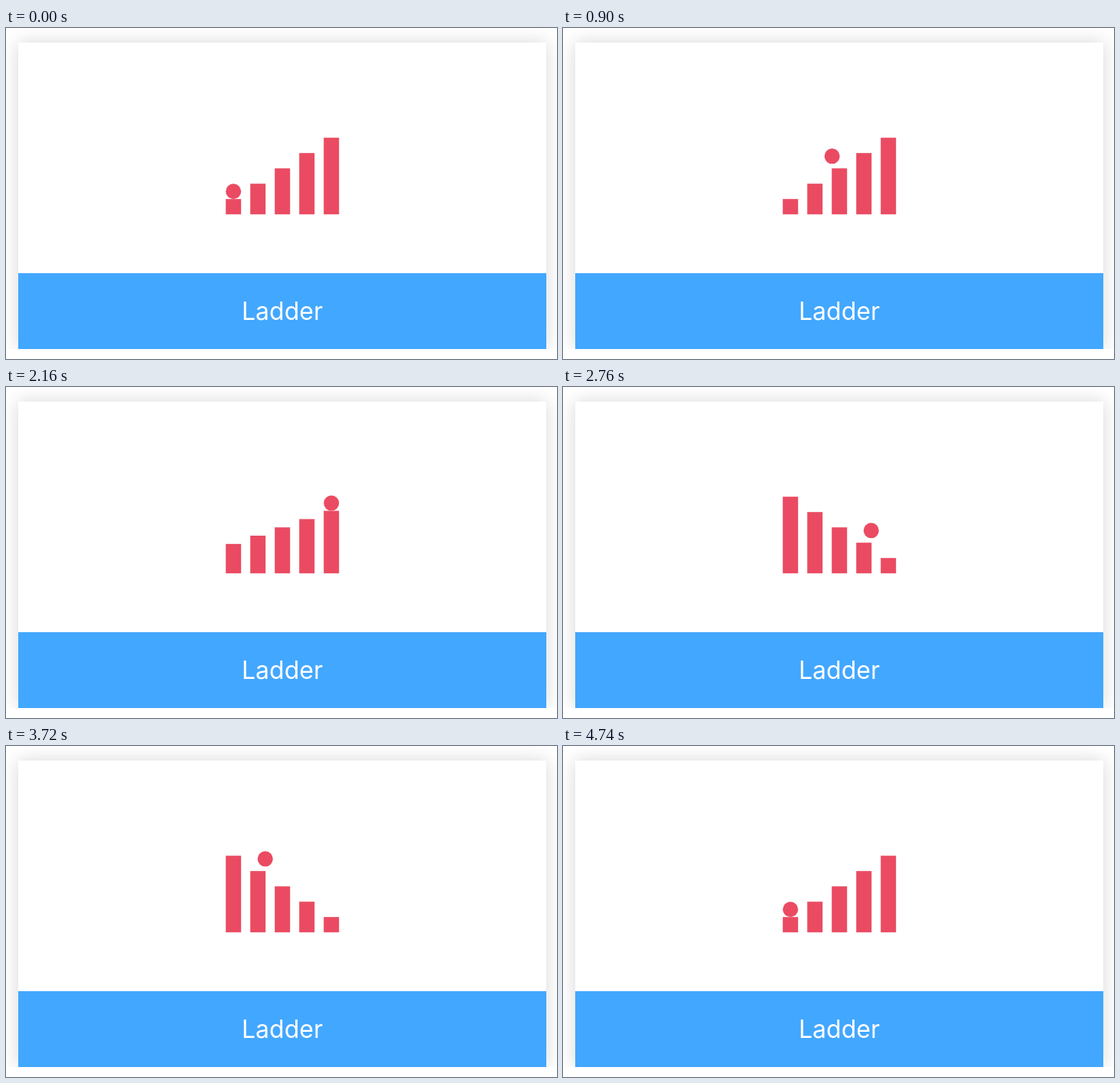
These frames come from a looping animation (720 by 432 pixels, 4.86 s). An HTML page:

```html
<!DOCTYPE html>
<html lang="en">
<head>
<meta charset="utf-8">
<title>Ladder</title>
<style>
  html, body { margin: 0; width: 100%; height: 100%; overflow: hidden; background: #fff; }
  .stage { position: relative; width: 720px; height: 419px; overflow: hidden; }
  .card {
    position: absolute; left: 16px; top: 19px; width: 690px; height: 400px;
    background: #fff; box-shadow: 0 0 22px rgba(0, 0, 0, .16);
  }
  svg { position: absolute; left: 0; top: 0; }
  text { font: 400 32px Inter, "Liberation Sans", sans-serif; fill: #fff; text-anchor: middle; }
</style>
</head>
<body>
<div class="stage">
  <div class="card"></div>
  <svg width="720" height="419">
    <rect x="16" y="320" width="690" height="99" fill="#42a7ff"/>
    <text x="361" y="381">Ladder</text>
    <g id="loader" fill="#ea4b62"></g>
  </svg>
</div>
<script>
const LOOP = 4860, TICK = 60, LEG = 240;
const LEFT = 287.2, BASE = 243.2, SIZE = 20, GAP = 32;
const APEX = [23, 26.5], STEP = [GAP, SIZE];

// Start times of the four hops and of the drop, climbing right then left.
const CLIMBS = [
  { hops: [228, 708, 1188, 1668], drop: 2119 },
  { hops: [2568, 3048, 3528, 3975], drop: 4455 }
];

const loader = document.getElementById('loader');
const add = (tag, attrs) => {
  const el = document.createElementNS('http://www.w3.org/2000/svg', tag);
  set(el, attrs);
  return loader.appendChild(el);
};
function set(el, attrs) {
  for (const key in attrs) el.setAttribute(key, attrs[key]);
}

const bars = [0, 1, 2, 3, 4].map(i => add('rect', { x: LEFT + i * GAP, width: SIZE }));
const ball = add('circle', { r: SIZE / 2 });

const mix = (a, b, p) => a + (b - a) * p;

// cubic-bezier(.25, .1, .25, 1), solved by bisection
function ease(x) {
  if (x <= 0) return 0;
  if (x >= 1) return 1;
  const curve = (a, b, u) => 3 * a * u * (1 - u) ** 2 + 3 * b * u * u * (1 - u) + u ** 3;
  let lo = 0, hi = 1;
  for (let i = 0; i < 24; i++) {
    const mid = (lo + hi) / 2;
    if (curve(.25, .25, mid) < x) lo = mid; else hi = mid;
  }
  return curve(.1, 1, lo);
}

// Offset from the lowest step: up to the apex, then down onto the next step.
function climbAt(t, hops) {
  let n = -1;
  while (n < 3 && t >= hops[n + 1]) n++;
  if (n < 0) return [0, 0];
  const rise = ease((t - hops[n]) / LEG);
  const land = ease((t - hops[n] - LEG) / LEG);
  return [0, 1].map(k => n * STEP[k] + mix(APEX[k] * rise, STEP[k], land));
}

function draw(t) {
  const back = t >= CLIMBS[1].hops[0];
  const { hops, drop } = CLIMBS[back ? 1 : 0];
  const fall = ease((t - drop) / LEG);
  const [dx, dy] = climbAt(t, hops);
  const flip = back ? 1 - fall : fall;

  bars.forEach((bar, i) => {
    const height = SIZE * mix(i + 1, 5 - i, flip);
    set(bar, { y: BASE - height, height });
  });
  set(ball, {
    cx: LEFT + SIZE / 2 + (back ? 4 * GAP - dx : dx),
    cy: BASE - SIZE * 1.5 - dy * (1 - fall)
  });
}

const start = performance.now();
function frame() {
  const t = (performance.now() - start) % LOOP;
  draw(Math.floor(t / TICK) * TICK);
  requestAnimationFrame(frame);
}
frame();
</script>
</body>
</html>
```
